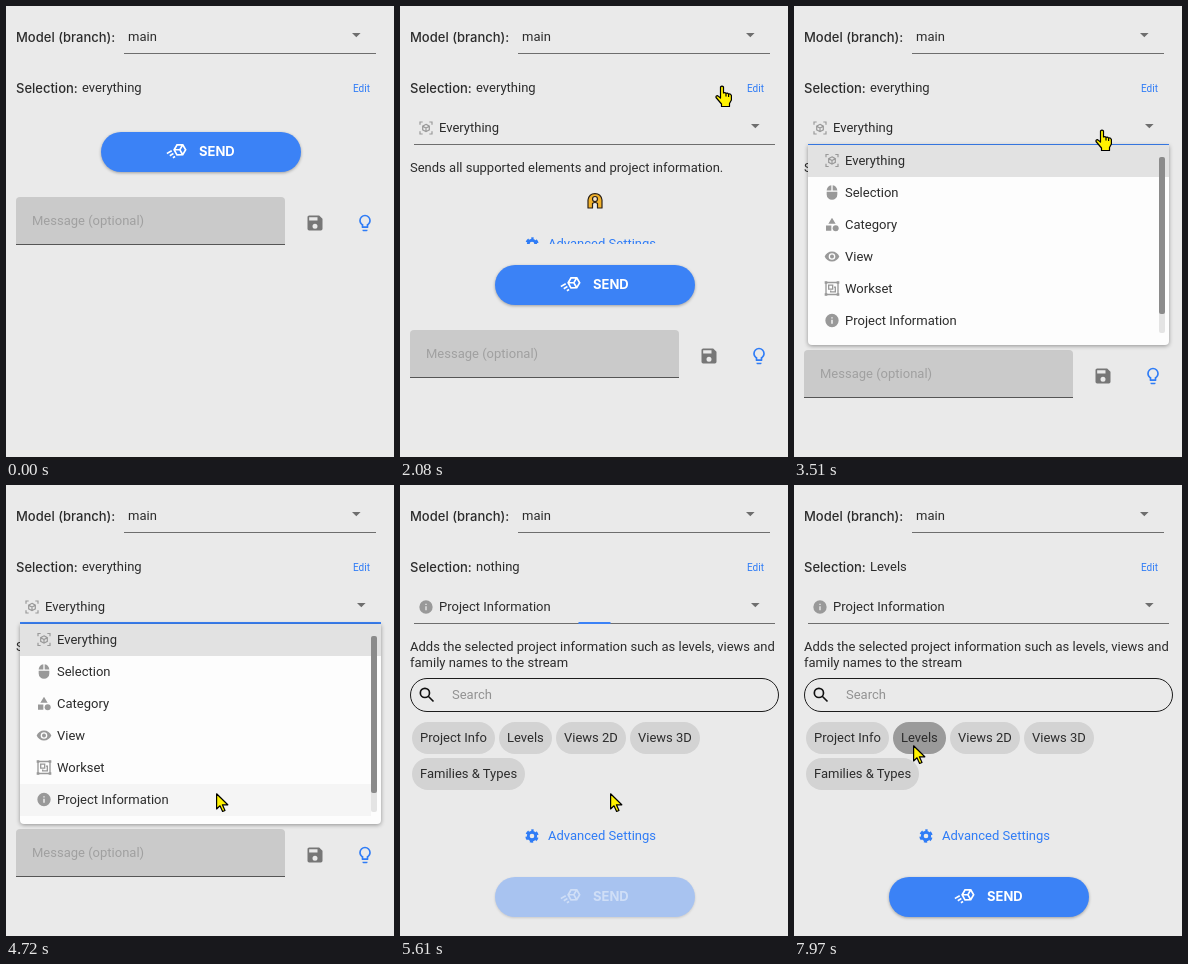
Animation, 388 px wide and 451 px high, one loop 8 s. Source, as an HTML page:

```html
<!DOCTYPE html>
<html lang="en">
<head>
<meta charset="utf-8">
<title>Send panel</title>
<style>
  html, body { margin: 0; width: 100%; height: 100%; overflow: hidden; background: #eaeaea; }
  svg { display: block; }
  text { font: 13px Roboto, Arial, sans-serif; fill: #2c2c2c; white-space: pre; }
  .label { font: 500 13px Inter, sans-serif; }
  .send { font: 700 13px Inter, sans-serif; fill: #fff; }
  .small { font-size: 10px; fill: #2f7cf6; }
  .link { fill: #2f7cf6; }
  .hint { fill: #a0a0a0; }
  .grey { fill: #999; color: #999; }
  .button { fill: #3b82f6; filter: drop-shadow(0 1.5px 1.5px rgba(0, 0, 0, .32)); }
  .card { fill: #fdfdfd; filter: drop-shadow(0 1px 2px rgba(0, 0, 0, .38)); }
  .disabled .button { fill: #a8c3f0; filter: drop-shadow(0 1px 1px rgba(0, 0, 0, .14)); }
  .disabled .face { opacity: .45; }
  .cursor { fill: #fff200; stroke: #000; stroke-width: 1.2; stroke-linejoin: round; }
  symbol path { fill-rule: evenodd; }
</style>
</head>
<body>
<svg width="388" height="451" viewBox="0 0 388 451">
  <defs>
    <symbol id="save" viewBox="0 0 24 24"><path d="M15 9H5V5H15M12 19A3 3 0 0 1 12 13A3 3 0 0 1 12 19M17 3H5C3.9 3 3 3.9 3 5V19A2 2 0 0 0 5 21H19A2 2 0 0 0 21 19V7Z"/></symbol>
    <symbol id="bulb" viewBox="0 0 24 24"><path d="M12 2A7 7 0 0 1 19 9C19 11.4 17.8 13.5 16 14.7V17A1 1 0 0 1 15 18H9A1 1 0 0 1 8 17V14.7C6.2 13.5 5 11.4 5 9A7 7 0 0 1 12 2M9 21V20H15V21A1 1 0 0 1 14 22H10A1 1 0 0 1 9 21M12 4A5 5 0 0 0 7 9C7 11 8.2 12.8 10 13.6V16H14V13.6C15.8 12.8 17 11 17 9A5 5 0 0 0 12 4Z"/></symbol>
    <symbol id="fly" viewBox="0 0 24 24"><path d="M16 4L9 8V16L16 20L23 16V8ZM16 6.3L19.8 8.5L16 10.7L12.2 8.5ZM0 7V9H7V7ZM11 10.1L15 12.4V17.1L11 14.8ZM21 10.1V14.8L17 17.1V12.4ZM2 11V13H7V11ZM4 15V17H7V15Z"/></symbol>
    <symbol id="cog" viewBox="0 0 24 24">
      <g fill="none" stroke="currentColor">
        <circle cx="12" cy="12" r="5.6" stroke-width="4.2"/>
        <circle cx="12" cy="12" r="8.5" stroke-width="3" stroke-dasharray="5 3.901" stroke-dashoffset="2.5" transform="rotate(-90 12 12)"/>
      </g>
    </symbol>
    <symbol id="cube" viewBox="0 0 24 24"><path fill="none" stroke="currentColor" stroke-width="1.8" d="M3 7V3H7M17 3H21V7M21 17V21H17M7 21H3V17M12 6.5L17 9.3V14.7L12 17.5L7 14.7V9.3ZM7 9.3L12 12L17 9.3M12 12V17.5"/></symbol>
    <symbol id="mouse" viewBox="0 0 24 24"><path d="M11 1C7 1.6 4 4.9 4 9H11ZM4 15A8 8 0 0 0 20 15V11H4ZM13 1V9H20C20 4.9 17 1.6 13 1Z"/></symbol>
    <symbol id="shapes" viewBox="0 0 24 24"><path d="M3 13.5H11V21.5H3ZM12 2L17.5 11H6.5Z"/><circle cx="17.5" cy="17.5" r="4.5"/></symbol>
    <symbol id="eye" viewBox="0 0 24 24"><path d="M12 4.5C7 4.5 2.7 7.6 1 12C2.7 16.4 7 19.5 12 19.5C17 19.5 21.3 16.4 23 12C21.3 7.6 17 4.5 12 4.5ZM12 7A5 5 0 0 1 12 17A5 5 0 0 1 12 7ZM12 9A3 3 0 0 1 12 15A3 3 0 0 1 12 9Z"/></symbol>
    <symbol id="group" viewBox="0 0 24 24"><path d="M1 1H5V5H1ZM19 1H23V5H19ZM1 19H5V23H1ZM19 19H23V23H19Z"/><path fill="none" stroke="currentColor" stroke-width="2" d="M3 3H21V21H3ZM7 7H13V13H7ZM15 10H17V17H10V15"/></symbol>
    <symbol id="info" viewBox="0 0 24 24"><path d="M12 2A10 10 0 0 0 12 22A10 10 0 0 0 12 2ZM11 7H13V9H11ZM11 11H13V17H11Z"/></symbol>
    <symbol id="find" viewBox="0 0 24 24"><path fill="none" stroke="currentColor" stroke-width="2" d="M9.5 4A5.5 5.5 0 0 1 9.5 15A5.5 5.5 0 0 1 9.5 4M13.8 13.8L19.8 19.8"/></symbol>
    <clipPath id="fold"><rect id="foldBox" width="388" height="451"/></clipPath>
  </defs>

  <text class="label" x="10" y="36">Model (branch):</text>
  <text x="122" y="35">main</text>
  <path fill="#6e6e6e" d="M118 47H370V48H118ZM346 27H354.6L350.3 31.3Z"/>
  <text class="label" x="10" y="87">Selection:</text>
  <text id="chosen" x="76" y="86"></text>
  <text class="small" x="347" y="86">Edit</text>

  <g id="panel" clip-path="url(#fold)">
    <use id="kindIcon" class="grey" x="18" y="114" width="16" height="16"/>
    <text id="kind" x="39" y="126"></text>
    <path fill="#6e6e6e" d="M351 118H359.6L355.3 122.3Z"/>
    <rect id="line" x="14" y="138" width="361" height="1"/>
    <rect id="focus" y="137" height="2" fill="#3b82f6"/>

    <g id="all">
      <text x="10" y="166">Sends all supported elements and project information.</text>
      <g stroke="#2b2118" stroke-width="1.2" stroke-linejoin="round">
        <path fill="#f3b32b" d="M188 202V194Q189 187.600 195 187.600Q201 187.600 202 194V202H197.500V197.500Q195 195.500 192.500 197.500V202Z"/>
        <circle cx="195" cy="193" r="2.500" fill="#f4e7cf"/>
      </g>
    </g>

    <g id="project">
      <text x="10" y="166">Adds the selected project information such as levels, views and</text>
      <text x="10" y="182">family names to the stream</text>
      <rect x="10.5" y="193.5" width="368" height="33" rx="16.5" fill="none" stroke="#1c1c1c"/>
      <use href="#find" x="17" y="200" width="20" height="20" color="#111"/>
      <text x="52" y="214" style="fill:#929292">Search</text>
      <g id="chips"></g>
    </g>

    <g id="settings" class="link" color="#2f7cf6">
      <use href="#cog" x="124" y="-8" width="16" height="16"/>
      <text class="link" x="148" y="4">Advanced Settings</text>
    </g>
  </g>

  <g id="foot">
    <rect class="button" x="95" width="200" height="40" rx="20"/>
    <g class="face">
      <use href="#fly" x="161" y="9.5" width="20" height="20" fill="#fff" transform="rotate(-30 171 19.5)"/>
      <text class="send" x="193" y="24">SEND</text>
    </g>
    <path fill="#cacaca" d="M10 112V69Q10 65 14 65H275Q279 65 279 69V112Z"/>
    <rect x="10" y="112" width="269" height="1" fill="#555"/>
    <text class="hint" x="26" y="93">Message (optional)</text>
    <use href="#save" x="299" y="81" width="20" height="20" fill="#777"/>
    <use href="#bulb" x="349" y="81" width="20" height="20" fill="#2f7cf6"/>
  </g>

  <g id="menu">
    <path class="card" d="M14 139H375V335Q375 339 371 339H18Q14 339 14 335Z"/>
    <rect x="14" y="139" width="361" height="32" fill="#e2e2e2"/>
    <rect id="hover" x="14" width="351" height="32" fill="#000" opacity=".03"/>
    <g id="rows"></g>
    <rect x="365" y="151" width="6" height="176" rx="2" fill="#e4e4e4"/>
    <rect x="365" y="151" width="6" height="157" rx="2" fill="#8b8b8b"/>
  </g>

  <g class="cursor">
    <path id="hand" d="M5.500 13V2Q7 .2 8.500 2V8Q10 7 11 8.400Q12.500 7.600 13.600 9Q15.600 8.600 16.400 10.500V15L14.500 18.500V21.500H6.500V19L1 12.500Q.6 10.600 2.600 10.600ZM11 8.400V11.500M13.600 9V12"/>
    <path id="arrow" d="M.6 .8V16L4 12.800L6.600 18.500L9 17.500L6.400 11.800H11.800Z"/>
  </g>
</svg>

<script>
const LOOP = 8000;
const $ = id => document.getElementById(id);
const set = (id, attrs) => {
  for (const key in attrs) $(id).setAttribute(key, attrs[key]);
};
const show = (id, on) => set(id, { display: on ? 'inline' : 'none' });

const kinds = [
  ['cube', 'Everything'], ['mouse', 'Selection'], ['shapes', 'Category'],
  ['eye', 'View'], ['group', 'Workset'], ['info', 'Project Information']
];
$('rows').innerHTML = kinds.map(([icon, name], i) => {
  const y = 154.5 + i * 32;
  return `<use class="grey" href="#${icon}" x="30" y="${y - 8}" width="16" height="16"/>
    <text x="51" y="${y + 4.5}">${name}</text>`;
}).join('');

const chips = [
  ['Project Info', 12, 237, 83], ['Levels', 99, 237, 53], ['Views 2D', 156, 237, 70],
  ['Views 3D', 230, 237, 70], ['Families & Types', 12, 273, 113]
];
$('chips').innerHTML = chips.map(([name, x, y, w]) =>
  `<rect x="${x}" y="${y}" width="${w}" height="32" rx="16" fill="#d3d3d3"/>
   <text x="${x + 8}" y="${y + 20}">${name.replace('&', '&amp;')}</text>`).join('');
const levels = $('chips').querySelectorAll('rect')[1];

// Each step changes part of the state from its time on.
const steps = [
  [0, { foot: 126, fold: 451, mode: '', chosen: 'everything', pointer: '', at: [0, 0],
        line: '#6e6e6e', focus: 0, menu: false, hover: -1, enabled: true, chip: '#d3d3d3' }],
  [1120, { pointer: 'hand', at: [358, 89] }],
  [1270, { at: [334, 84] }],
  [1390, { at: [315, 79] }],
  [2080, { mode: 'all', foot: 259, fold: 238 }],
  [2220, { foot: 279, fold: 451 }],
  [2810, { at: [313, 82] }],
  [2930, { at: [302, 112] }],
  [3080, { at: [301, 118], line: '#3b82f6' }],
  [3210, { at: [301, 121] }],
  [3360, { at: [301, 123] }],
  [3510, { menu: true }],
  [3750, { at: [304, 123] }],
  [3900, { focus: 361 }],
  [4170, { pointer: 'arrow', at: [303, 133] }],
  [4320, { at: [262, 200], hover: 1 }],
  [4440, { at: [224, 256], hover: 3 }],
  [4590, { at: [213, 296], hover: 4 }],
  [4720, { at: [210, 308], hover: 5 }],
  [5300, { menu: false }],
  [5460, { mode: 'project', foot: 392, chosen: 'nothing', enabled: false, line: '#6e6e6e', focus: 179 }],
  [5610, { focus: 32 }],
  [5760, { focus: 8 }],
  [5880, { focus: 0 }],
  [6310, { at: [209, 308] }],
  [6460, { at: [187, 302] }],
  [6580, { at: [173, 297] }],
  [6730, { at: [147, 274] }],
  [6850, { at: [128, 253] }],
  [7000, { at: [125, 251] }],
  [7270, { chosen: 'Levels', enabled: true, chip: '#b8b8b8' }],
  [7420, { chip: '#a6a6a6' }],
  [7550, { chip: '#9a9a9a' }],
  [7970, { at: [119, 260] }]
];

function draw(time) {
  const s = Object.assign({}, ...steps.filter(step => step[0] <= time).map(step => step[1]));
  const [icon, kind] = kinds[s.mode === 'project' ? 5 : 0];
  const [x, y] = s.at;

  $('chosen').textContent = s.chosen;
  show('panel', s.mode);
  show('all', s.mode === 'all');
  show('project', s.mode === 'project');
  set('foldBox', { height: s.fold });
  set('kindIcon', { href: '#' + icon });
  $('kind').textContent = kind;
  set('line', { fill: s.line });
  set('focus', { x: 194.5 - s.focus / 2, width: s.focus });
  set('settings', { transform: `translate(0 ${s.mode === 'project' ? 351 : 238})` });
  levels.setAttribute('fill', s.chip);

  set('foot', { transform: `translate(0 ${s.foot})`, class: s.enabled ? '' : 'disabled' });
  show('menu', s.menu);
  show('hover', s.hover >= 0);
  set('hover', { y: 139 + s.hover * 32 });
  for (const id of ['hand', 'arrow']) {
    show(id, s.pointer === id);
    set(id, { transform: `translate(${x} ${y})` });
  }
}

const start = performance.now();
function tick() {
  draw((performance.now() - start) % LOOP);
  requestAnimationFrame(tick);
}
tick();
</script>
</body>
</html>
```
